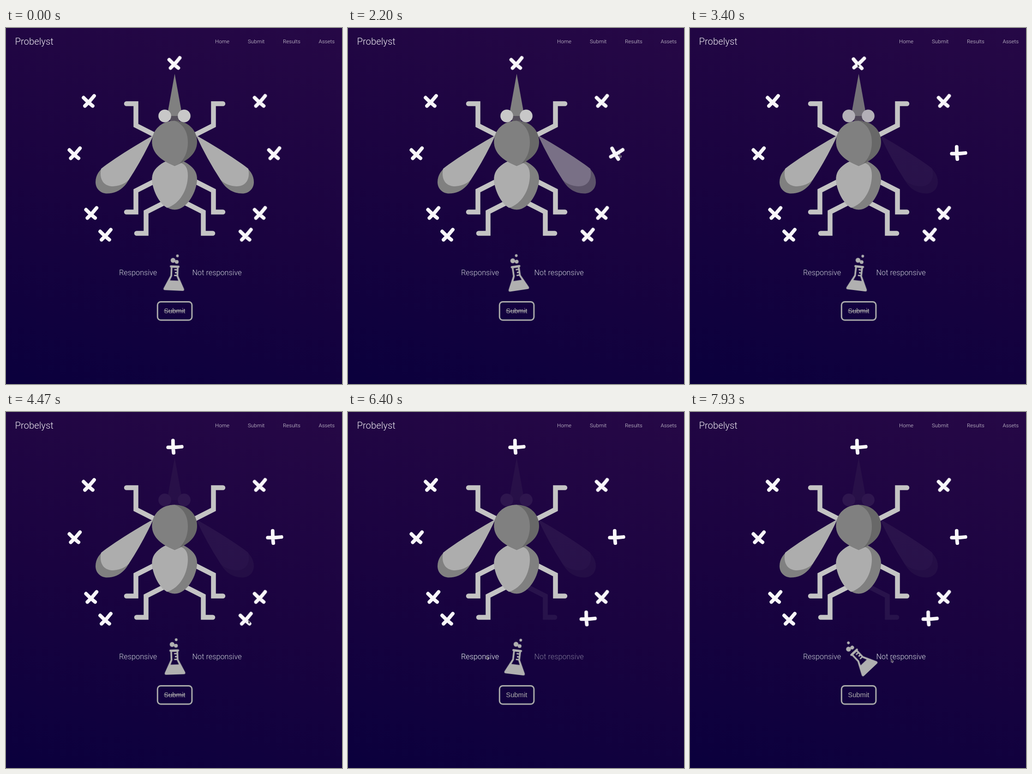
An HTML page that plays this animation: 728x769 px, repeating every 8 s.

```html
<!DOCTYPE html>
<html lang="en">
<head>
<meta charset="utf-8">
<title>Probelyst</title>
<style>
  html, body { margin: 0; width: 100%; height: 100%; overflow: hidden; background: #16023f; }
  body { background: linear-gradient(15deg, #0b003d 2%, #1a0340 48%, #260846 100%); }
  svg { display: block; width: 728px; height: 769px; }
  text { font-family: Roboto, "Open Sans", sans-serif; font-weight: 300; }
  .title { font-size: 20.3px; fill: #f0edf3; }
  .nav { font-size: 11.6px; font-weight: 400; fill: #dedbe2; }
  .label { font-size: 16.3px; fill: #ecf4f4; }
  .button { font: 14.8px "Liberation Sans", Arial, sans-serif; fill: #b0b0ae; }
  .legs { fill: none; stroke: #c4c4c4; stroke-width: 10.5; stroke-linecap: round; }
  .mark { fill: none; stroke: #f9f7fa; stroke-width: 7.8; stroke-linecap: round; }

  .moving { animation: 8s ease infinite; }
  .wing-off { animation-name: wing-off; }
  .head-off { animation-name: head-off; }
  .leg-off { animation-name: leg-off; }
  .wing-turn { animation-name: wing-turn; }
  .head-turn { animation-name: head-turn; }
  .leg-turn { animation-name: leg-turn; }
  .yes { animation-name: yes; }
  .no { animation-name: no; }
  .strike { animation-name: strike; animation-timing-function: step-end; }
  .flask { animation-name: flask; animation-timing-function: cubic-bezier(.37, 0, .63, 1); }
  .cursor { animation-name: cursor, appear; animation-timing-function: ease-in-out, step-end; }

  @keyframes wing-off { 0%, 26% { opacity: 1 } 32.25%, 100% { opacity: .09 } }
  @keyframes head-off { 0%, 41.75% { opacity: 1 } 48%, 100% { opacity: .09 } }
  @keyframes leg-off { 0%, 58.75% { opacity: 1 } 65%, 100% { opacity: .09 } }
  @keyframes wing-turn { 0%, 26% { transform: rotate(-45deg) } 32.25%, 100% { transform: none } }
  @keyframes head-turn { 0%, 41.75% { transform: rotate(-45deg) } 48%, 100% { transform: none } }
  @keyframes leg-turn { 0%, 58.75% { transform: rotate(-45deg) } 65%, 100% { transform: none } }
  @keyframes yes { 0%, 74.4% { opacity: .84 } 78%, 94% { opacity: 1 } 98%, 100% { opacity: .84 } }
  @keyframes no { 0%, 74.4% { opacity: .84 } 78%, 94% { opacity: .48 } 98%, 100% { opacity: .9 } }
  @keyframes strike { 0% { opacity: 1 } 74.4%, 100% { opacity: 0 } }
  @keyframes flask {
    0% { transform: rotate(2.3deg); animation-timing-function: cubic-bezier(.4, .65, .7, 1) }
    7.875% { transform: rotate(7.6deg) }
    26.625% { transform: rotate(-8.4deg) }
    45.375% { transform: rotate(7.6deg) }
    64.125% { transform: rotate(-8.4deg) }
    82.875% { transform: rotate(7.6deg) }
    95% { transform: rotate(-5deg); animation-timing-function: ease }
    100% { transform: rotate(-44deg) }
  }
  @keyframes cursor {
    0%, 11.625% { transform: translate(503px, 395px) }
    25%, 28% { transform: translate(588px, 272px) }
    40.5%, 43.5% { transform: translate(363px, 78px) }
    54.5%, 60% { transform: translate(525px, 450px) }
    73%, 82% { transform: translate(300px, 527px) }
    91.5%, 100% { transform: translate(436px, 533.5px) }
  }
  @keyframes appear { 0% { opacity: 0 } 8%, 100% { opacity: 1 } }
</style>
</head>
<body>
<svg viewBox="0 0 728 769">
  <defs>
    <path id="cross" d="M-14.8 1.4Q0 1.8 14.8 0M-4.2-13.4Q-4.2 2-2.8 13.2"/>
    <g id="wing">
      <path fill="#808080" d="M319 232Q262 264 218 295C202 306 194 318 194 333C194 347 205 357.5 219 357.5C240 357.5 257 346 267 326Q296 282 319 232Z"/>
      <path fill="#adadad" d="M319 232Q262 264 218 295Q211 300 206 304C202 324 209 342 232 342Q253 341 266 328Q296 282 319 232Z"/>
    </g>
    <path id="front-leg" d="M261 163.5H281.5V210.5L322 231"/>
    <path id="middle-leg" d="M261 397.5H281.5V351.5L320 332"/>
    <path id="back-leg" d="M283 443.5H303.5V397.5L342 378"/>
  </defs>

  <text class="title" x="19.5" y="36.3">Probelyst</text>
  <g class="nav">
    <text x="453" y="33">Home</text>
    <text x="524" y="33">Submit</text>
    <text x="600" y="33">Results</text>
    <text x="677.5" y="33">Assets</text>
  </g>

  <g class="legs">
    <use href="#front-leg"/>
    <use href="#middle-leg"/>
    <use href="#back-leg"/>
    <g transform="matrix(-1 0 0 1 731 0)">
      <use href="#front-leg"/>
      <use href="#middle-leg"/>
      <g class="moving leg-off"><use href="#back-leg"/></g>
    </g>
  </g>
  <use href="#wing"/>
  <g class="moving wing-off"><use href="#wing" transform="matrix(-1 0 0 1 731 0)"/></g>

  <g class="moving head-off">
    <path fill="#56505c" d="M351 189H380L374 203H357Z"/>
    <path fill="#808080" d="M365.5 99L382 190H349Z"/>
    <circle fill="#c8c8c8" cx="344" cy="190" r="13.8"/>
    <circle fill="#c8c8c8" cx="386" cy="190" r="13.8"/>
  </g>

  <path fill="#808080" d="M365.5 280C335 291 316.5 304 316.5 326C316.5 352 338 392.5 365.5 392.5S414 352 414 326C414 304 396 291 365.5 280Z"/>
  <path fill="#adadad" d="M365.5 280C335 291 316.5 304 316.5 326C316.5 347 330 378 349 388.5C376 380 394 350 394 318Q394 294 376 291Z"/>
  <path fill="#686868" d="M365.5 298C330 284 316.5 266 316.5 246C316.5 219 338 200.5 365.5 200.5S414 219 414 246C414 266 401 284 365.5 298Z"/>
  <path fill="#808080" d="M365.5 298C330 284 316.5 266 316.5 246C316.5 219 338 200.5 365.5 200.5C384 207 394 225 394 247Q394 276 375 293.5Z"/>

  <g class="mark" id="marks"></g>

  <text class="label moving yes" x="245" y="533.8">Responsive</text>
  <text class="label moving no" x="403.5" y="533.8">Not responsive</text>

  <g transform="translate(365 529)">
    <g class="moving flask" fill="#b0b0b0">
      <circle cx="5" cy="-37" r="2.9"/>
      <circle cx="-4.2" cy="-27" r="5.2"/>
      <circle cx="4" cy="-24" r="4.1"/>
      <rect x="-10.5" y="-16" width="21" height="4.6" rx="2"/>
      <path fill-rule="evenodd" d="M-8.5-13V6L-22 33.5Q-23.5 38-19 38H19Q23.5 38 22 33.5L8.5 6V-13ZM-4.8-11V7L-9 16.5H9L4.8 7V-11Z"/>
      <path d="M5-8.5H-.5V-5.5H5ZM5-2H1V1H5ZM5 4H-.5V7H5Z"/>
    </g>
  </g>

  <rect x="328.3" y="591.5" width="74.6" height="39.5" rx="7" fill="none" stroke="#aaa" stroke-width="3"/>
  <text class="button" x="365.3" y="616" text-anchor="middle">Submit</text>
  <rect class="moving strike" x="342.3" y="610.6" width="46" height="1.3" fill="#b0b0ae"/>

  <path class="moving cursor" d="M0 0V7.2L1.7 5.8L2.8 8.2L3.9 7.7L2.9 5.3H5Z" fill="#16101f" stroke="#d8d4dc" stroke-width=".8"/>
</svg>
<script>
  const marks = [
    [366, 75, "head-turn"], [180.5, 157], [551, 157],
    [149.8, 270], [582, 270, "wing-turn"], [185.8, 399],
    [551, 399], [216.5, 446], [520.3, 446, "leg-turn"]
  ];
  document.getElementById("marks").innerHTML = marks.map(([x, y, turn]) => {
    const pose = turn ? `class="moving ${turn}"` : 'transform="rotate(-45)"';
    return `<g transform="translate(${x} ${y})"><g ${pose}><use href="#cross"/></g></g>`;
  }).join("");
</script>
</body>
</html>
```
